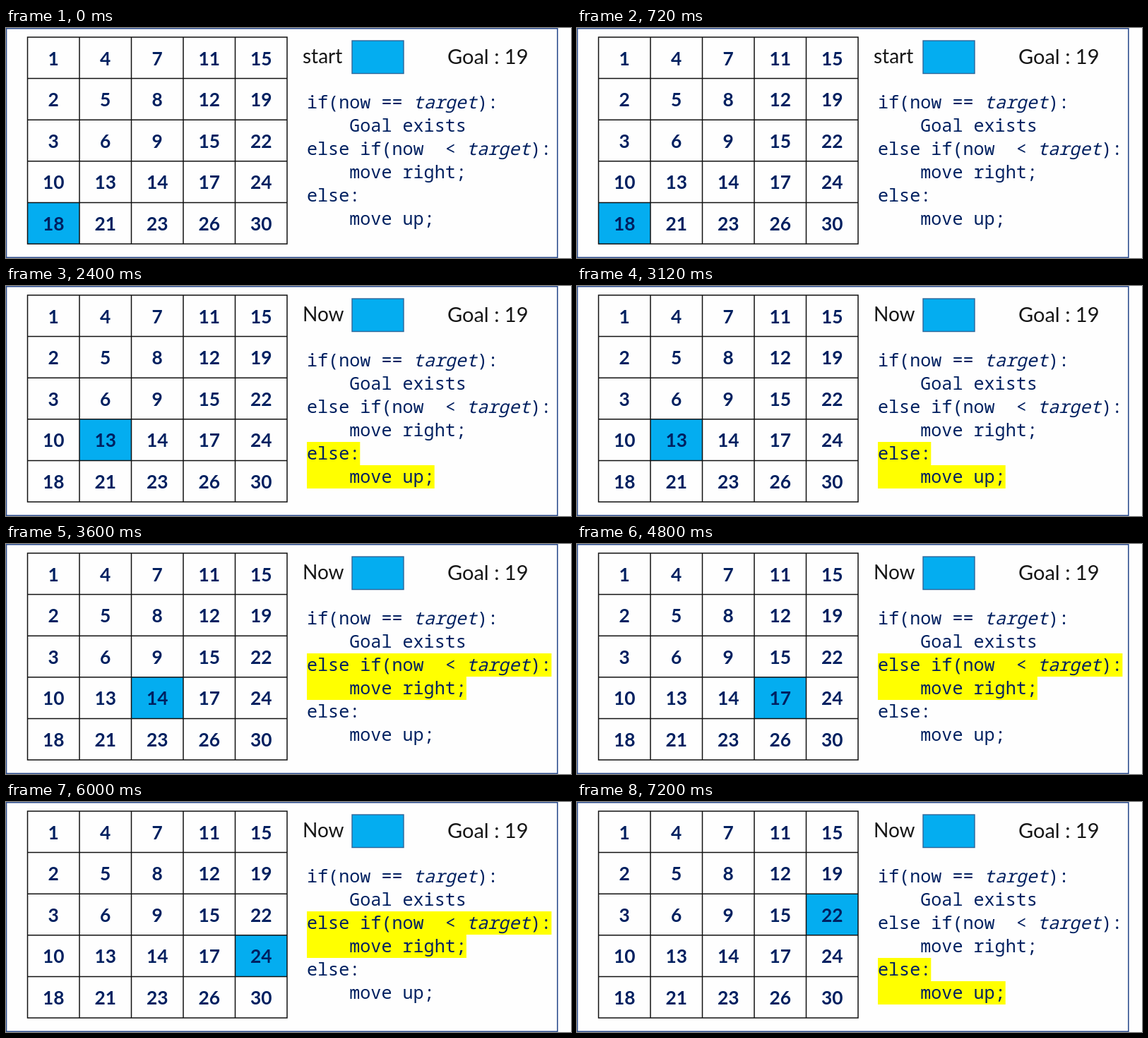
Recreate the animation shown at these times as an HTML page with a canvas. Size 800 px wide and 326 px high, loop 8000 ms.

```html
<!DOCTYPE html>
<html lang="en">
<head>
<meta charset="utf-8">
<title>Staircase search in a sorted matrix</title>
<style>
  html, body { margin: 0; width: 100%; height: 100%; overflow: hidden; background: #fefefe; }
  canvas { display: block; }
</style>
</head>
<body>
<canvas id="stage" width="800" height="326"></canvas>
<script>
const ctx = document.getElementById('stage').getContext('2d');
const STEP = 1200, LOOP = 8000, GOAL = 19;
const NAVY = '#002060', BLUE = '#04adf0', YELLOW = '#ffff00', EDGE = '#2f4f8f';
const LEFT = 30.5, TOP = 13, CELL_W = 73.5, CELL_H = 58.6;
const CODE_X = 426, CODE_Y = 89, LINE_H = 33, CHAR_W = 15.06;

const matrix = [
  [1, 4, 7, 11, 15],
  [2, 5, 8, 12, 19],
  [3, 6, 9, 15, 22],
  [10, 13, 14, 17, 24],
  [18, 21, 23, 26, 30]
];
const code = [
  'if(now == *target*):',
  '    Goal exists',
  'else if(now  < *target*):',
  '    move right;',
  'else:',
  '    move up;'
];

// Each state holds the current cell and the first code line of the move that led there.
const states = [{ row: 4, col: 0, line: -1 }];
while (states.length < Math.ceil(LOOP / STEP)) {
  const { row, col } = states[states.length - 1];
  states.push(matrix[row][col] < GOAL
    ? { row, col: col + 1, line: 2 }
    : { row: row - 1, col, line: 4 });
}

function fillBox(x, y, w, h, color) {
  ctx.fillStyle = color;
  ctx.fillRect(x, y, w, h);
}

function strokeBox(x, y, w, h, color, weight) {
  ctx.strokeStyle = color;
  ctx.lineWidth = weight;
  ctx.strokeRect(x, y, w, h);
}

function write(text, x, y, font, color = NAVY, align = 'left') {
  ctx.font = font;
  ctx.fillStyle = color;
  ctx.textAlign = align;
  ctx.fillText(text, x, y);
}

function drawGrid({ row, col }) {
  fillBox(LEFT + col * CELL_W, TOP + row * CELL_H, CELL_W, CELL_H, BLUE);
  ctx.strokeStyle = '#111';
  ctx.lineWidth = 1.5;
  ctx.beginPath();
  for (let i = 0; i <= 5; i++) {
    const x = LEFT + i * CELL_W, y = TOP + i * CELL_H;
    ctx.moveTo(x, TOP - 0.7);
    ctx.lineTo(x, TOP + 5 * CELL_H + 0.7);
    ctx.moveTo(LEFT, y);
    ctx.lineTo(LEFT + 5 * CELL_W, y);
  }
  ctx.stroke();
  matrix.forEach((values, r) => values.forEach((value, c) =>
    write(value, LEFT + (c + 0.5) * CELL_W, TOP + r * CELL_H + 39.5,
      'bold 26.3px Lato, sans-serif', NAVY, 'center')));
}

function drawCode(active) {
  code.forEach((line, i) => {
    const y = CODE_Y + i * LINE_H;
    const length = line.replaceAll('*', '').length;
    if (active >= 0 && (i === active || i === active + 1))
      fillBox(CODE_X, y, length * CHAR_W, LINE_H, YELLOW);
    let x = CODE_X;
    line.split('*').forEach((part, k) => {
      write(part, x, y + 25, (k % 2 ? 'italic ' : '') + '25.1px "Noto Sans Mono", monospace');
      x += part.length * CHAR_W;
    });
  });
}

function draw(time) {
  const index = Math.floor(time % LOOP / STEP), state = states[index];
  fillBox(0, 0, 800, 326, '#fefefe');
  strokeBox(0.5, 0.7, 780.3, 324.6, EDGE, 1.6);
  drawGrid(state);
  write(index ? 'Now' : 'start', 420, 49.5, '28px Lato, sans-serif', '#161616');
  fillBox(490, 18, 73, 46.5, BLUE);
  strokeBox(490, 18, 73, 46.5, '#2f6699', 1.4);
  write('Goal : ' + GOAL, 625, 51, '29px Lato, sans-serif', '#161616');
  drawCode(state.line);
}

const start = performance.now();
function tick() {
  draw(performance.now() - start);
  requestAnimationFrame(tick);
}
tick();
</script>
</body>
</html>
```
